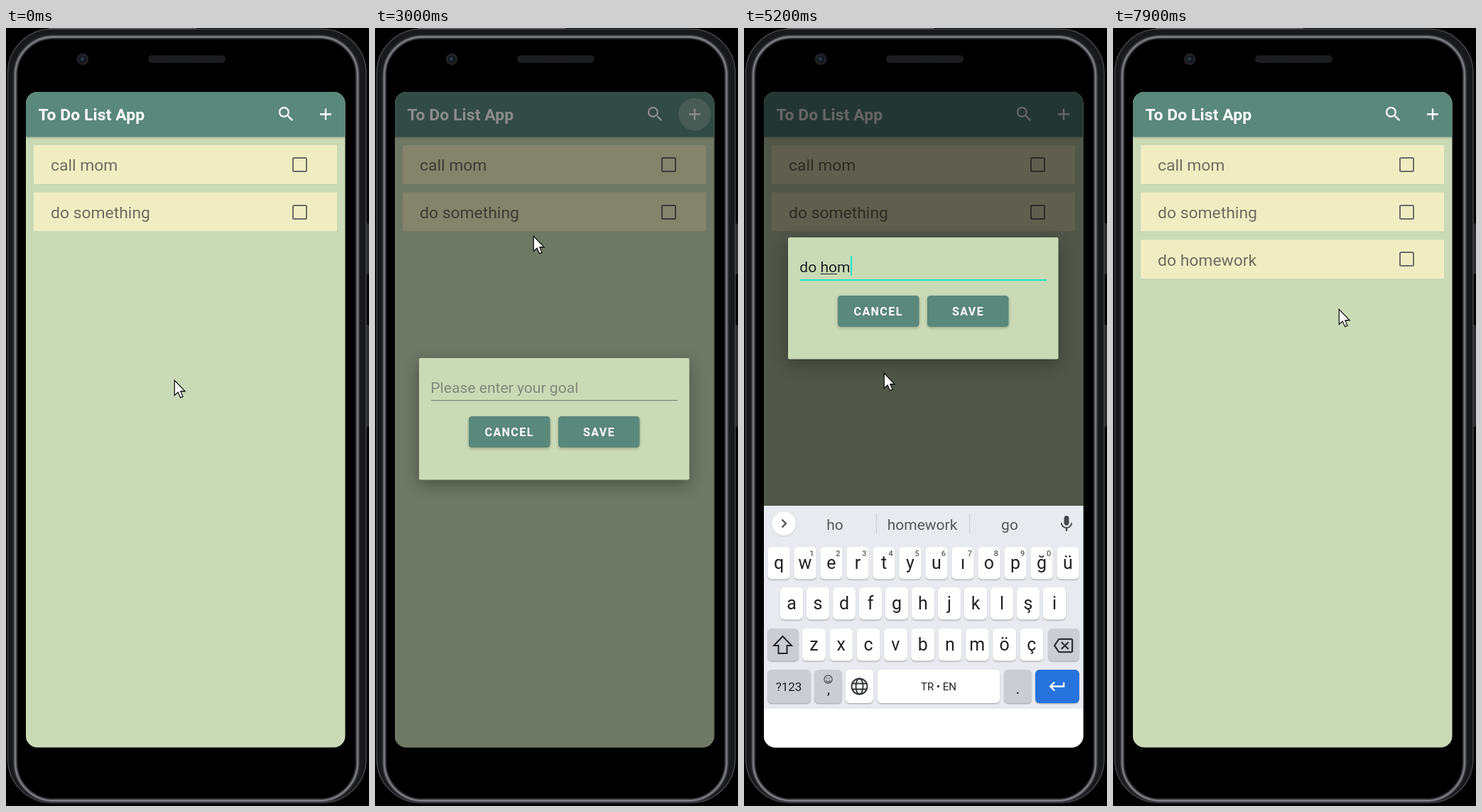
Recreate the animation shown at these times as an HTML page with a canvas. Size 511 by 1096 pixels, loop 8000 ms.

```html
<!DOCTYPE html>
<html lang="en">
<head>
<meta charset="utf-8">
<title>To Do List App</title>
<style>
html, body { margin: 0; width: 100%; height: 100%; overflow: hidden; background: #000; }
canvas { display: block; width: 511px; height: 1096px; }
</style>
</head>
<body>
<canvas id="stage"></canvas>
<script>
const W = 511, H = 1096, LOOP = 8000, STEP = 100;
const canvas = document.getElementById('stage');
const ctx = canvas.getContext('2d');
const dpr = window.devicePixelRatio || 1;
canvas.width = W * dpr;
canvas.height = H * dpr;

const TEAL = '#5a887b', GREEN = '#cadab7', ACCENT = '#1fe6c2', INK = '#202124';
const ICON = {
  search: 'M15.5 14h-.79l-.28-.27C15.41 12.59 16 11.11 16 9.5 16 5.91 13.09 3 9.5 3S3 5.91 3 9.5 5.91 16 9.5 16c1.61 0 3.09-.59 4.23-1.57l.27.28v.79l5 4.99L20.49 19l-4.99-5zm-6 0C7.01 14 5 11.99 5 9.5S7.01 5 9.5 5 14 7.01 14 9.5 11.99 14 9.5 14z',
  plus: 'M19 13h-6v6h-2v-6H5v-2h6V5h2v6h6v2z',
  mic: 'M12 14c1.66 0 3-1.34 3-3V5c0-1.66-1.34-3-3-3S9 3.34 9 5v6c0 1.66 1.34 3 3 3zm5.3-3c0 3-2.54 5.1-5.3 5.1S6.7 14 6.7 11H5c0 3.41 2.72 6.23 6 6.72V21h2v-3.28c3.28-.48 6-3.3 6-6.72h-1.7z',
  erase: 'M22 3H7c-.69 0-1.23.35-1.59.88L0 12l5.41 8.11c.36.53.9.89 1.59.89h15c1.1 0 2-.9 2-2V5c0-1.1-.9-2-2-2zm0 16H7.07L2.4 12l4.66-7H22v14zm-11.59-2L14 13.41 17.59 17 19 15.59 15.41 12 19 8.41 17.59 7 14 10.59 10.41 7 9 8.41 12.59 12 9 15.59z',
  enter: 'M19 7v4H5.83l3.58-3.59L8 6l-6 6 6 6 1.41-1.41L5.83 13H21V7z'
};
for (const name in ICON) ICON[name] = new Path2D(ICON[name]);

// Pointer way points: time, x, y
const PATH = [
  [0, 237, 496], [1000, 237, 496], [1300, 248, 463], [1800, 400, 235],
  [2200, 447, 117], [2700, 447, 117], [3000, 223, 293], [3400, 197, 486],
  [6100, 197, 486], [6600, 318, 396], [LOOP, 318, 396]
];
const GOAL = 'do homework';
const TYPED = [4600, 4700, 4800, 4900, 5000, 5200, 5400, 5500, 5600, 5700, 5900];

const clamp = v => Math.max(0, Math.min(1, v));
const ramp = (t, from, to) => clamp((t - from) / (to - from));
const ease = v => v * v * (3 - 2 * v);

function box(x, y, w, h, r) {
  ctx.beginPath();
  ctx.roundRect(x, y, w, h, r);
}

function fillBox(x, y, w, h, r, color) {
  box(x, y, w, h, r);
  ctx.fillStyle = color;
  ctx.fill();
}

function shadowBox(x, y, w, h, r, color, drop, blur, alpha) {
  ctx.save();
  ctx.shadowColor = `rgba(0,0,0,${alpha})`;
  ctx.shadowOffsetY = drop * dpr;
  ctx.shadowBlur = blur * dpr;
  fillBox(x, y, w, h, r, color);
  ctx.restore();
}

function disc(x, y, r, color) {
  ctx.beginPath();
  ctx.arc(x, y, r, 0, 7);
  ctx.fillStyle = color;
  ctx.fill();
}

function stroke(color, width) {
  ctx.strokeStyle = color;
  ctx.lineWidth = width;
  ctx.stroke();
}

function line(points, color, width, close) {
  ctx.beginPath();
  points.forEach(([x, y]) => ctx.lineTo(x, y));
  if (close) ctx.closePath();
  stroke(color, width);
}

function label(str, x, y, size, color, { weight = 400, align = 'left', gap = 0, max } = {}) {
  ctx.font = `${weight} ${size}px Roboto, sans-serif`;
  ctx.letterSpacing = gap + 'px';
  ctx.textAlign = align;
  ctx.fillStyle = color;
  if (max) ctx.fillText(str, x, y, max);
  else ctx.fillText(str, x, y);
  ctx.letterSpacing = '0px';
}

function icon(name, cx, cy, color) {
  ctx.save();
  ctx.translate(cx, cy);
  ctx.scale(1.145, 1.145);
  ctx.translate(-12, -12);
  ctx.fillStyle = color;
  ctx.fill(ICON[name]);
  ctx.restore();
}

function drawPhone() {
  ctx.fillStyle = '#000';
  ctx.fillRect(0, 0, W, H);
  ctx.fillStyle = '#666769';
  ctx.fillRect(60, 0, 208, 1);
  for (const [y, h] of [[275, 72], [418, 144]]) {
    fillBox(506, y, 5, h, 2, '#2a2b2d');
  }
  fillBox(2.5, 1.5, 504.5, 1090, 62, '#18191b');
  stroke('#454648', 1.5);

  box(13, 12.5, 482, 1076, 54);
  ctx.fillStyle = '#000';
  ctx.fill();
  stroke('#303134', 6.5);
  stroke('#77797c', 2.8);

  disc(108, 44, 8.2, '#222427');
  disc(108, 44, 5.6, '#14181e');
  disc(107.5, 43.5, 2.6, '#27384a');
  fillBox(200, 38.5, 109, 10.5, 5, '#1d1e20');
  ctx.fillStyle = '#121314';
  for (let x = 204; x < 306; x += 4) {
    ctx.fillRect(x, 41, 1.5, 1.5);
    ctx.fillRect(x + 2, 45, 1.5, 1.5);
  }
}

function drawItem(str, y) {
  shadowBox(39, y, 427, 55, 1, '#f0edc3', 0.5, 1.5, 0.08);
  label(str, 63, y + 36.3, 22.9, '#6e6d5d');
  box(404, Math.round(y) + 18, 19, 19, 1.5);
  stroke('#6d6c67', 2);
}

function drawApp(t) {
  ctx.fillStyle = GREEN;
  ctx.fillRect(28, 90, 450, 924);
  shadowBox(28, 90, 450, 63.5, 0, TEAL, 1, 3, 0.15);
  const press = ramp(t, 2500, 2700) * (1 - ramp(t, 3000, 3300));
  if (press > 0) disc(450, 121.5, 14 + 9 * ramp(t, 2500, 2800), `rgba(255,255,255,${0.24 * press})`);
  label('To Do List App', 45.5, 130.3, 22.9, '#fff', { weight: 600, gap: 0.1 });
  icon('search', 394.3, 121.3, '#fff');
  icon('plus', 450, 121.5, '#fff');
  drawItem('call mom', 165);
  drawItem('do something', 231.6);
  const added = ramp(t, 6950, 7200);
  if (added > 0) {
    ctx.globalAlpha = added;
    drawItem('do homework', 298.2);
    ctx.globalAlpha = 1;
  }
}

function drawButton(str, x, textX, y) {
  shadowBox(x, y, 114.5, 44, 4.5, TEAL, 1.5, 4, 0.25);
  label(str, textX, y + 28.4, 16, '#fff', { weight: 600, gap: 1.43 });
}

function drawField(t, y) {
  const focus = t >= 3700, x = 78.3, size = 21.1;
  const count = TYPED.filter(s => s <= t).length;
  const marked = TYPED.filter(s => s < t).length;
  const text = GOAL.slice(0, count);
  if (count) label(text, x, y + 48.5, size, INK);
  else label('Please enter your goal', x, y + 48.5, size, '#82897a');

  const wide = n => ctx.measureText(GOAL.slice(0, n)).width;
  if (marked > 3) {
    ctx.fillStyle = INK;
    ctx.fillRect(x + wide(3), y + 51, wide(marked) - wide(3), 1);
  }
  ctx.fillStyle = focus ? ACCENT : '#7b8373';
  ctx.fillRect(79, y + 59, 347, focus ? 2.2 : 1.2);

  const last = count ? TYPED[count - 1] : 3700;
  if (focus && (t - last) % 1000 < 500) {
    ctx.fillStyle = ACCENT;
    ctx.fillRect(x + 0.3 + wide(count), y + 26, 2.2, 28);
  }
}

function drawDialog(t) {
  const show = ramp(t, 2800, 2980) * (1 - ramp(t, 6900, 7080));
  if (show <= 0) return;
  const y = 465 - 170 * ease(ramp(t, 3715, 4015));
  const scale = t < 4000 ? 0.9 + 0.1 * show : 1;
  ctx.save();
  ctx.globalAlpha = show;
  ctx.translate(252, y + 86);
  ctx.scale(scale, scale);
  ctx.translate(-252, -y - 86);
  shadowBox(62, y, 380.5, 171.5, 2, '#cbdab6', 7, 22, 0.32);
  drawField(t, y);
  drawButton('CANCEL', 132, 154.5, y + 82);
  drawButton('SAVE', 258, 293, y + 82);
  if (t >= 6600) {
    box(258, y + 82, 114.5, 44, 4.5);
    ctx.clip();
    disc(317, y + 103, 10 + 30 * ramp(t, 6600, 6800), 'rgba(255,255,255,.2)');
  }
  ctx.restore();
}

function drawKey(cx, y, w, color = '#fff', h = 45.5) {
  shadowBox(cx - w / 2, y, w, h, 6, color, 1.2, 1.5, 0.28);
}

function drawLetters(str, x, pitch, y, w) {
  [...str].forEach((ch, i) => {
    const cx = x + i * pitch;
    drawKey(cx, y, w);
    label(ch, cx, y + 31, 25, INK, { align: 'center' });
  });
}

function drawTools() {
  const grey = '#55585d';
  icon('search', 116, 698, grey);
  box(171, 688, 18, 19, 3);
  stroke(grey, 2);
  disc(177, 694, 1.4, grey);
  disc(183, 694, 1.4, grey);
  ctx.beginPath();
  ctx.arc(180, 697, 5, 0.2, Math.PI - 0.2);
  stroke(grey, 1.8);
  line([[183, 707], [183, 701], [189, 701]], grey, 1.5);
  label('GIF', 244, 703, 16, grey, { weight: 900, align: 'center', gap: 0.5 });
  box(301, 689, 17, 19, 2);
  stroke(grey, 2);
  fillBox(305, 686, 9, 6, 2, grey);
  for (const y of [696, 700, 704]) line([[305, y], [314, y]], grey, 1.5);
  line([[348.5, 684], [348.5, 712]], '#cfd1d6', 1);
  for (const x of [382, 389.5, 397]) disc(x, 697.5, 2.5, grey);
}

function drawHints(t) {
  const words = t > 5500 ? ['homework', 'homeworks', 'homeworking'] : ['ho', 'homework', 'go'];
  words.forEach((word, i) => {
    label(word, 128 + 123 * i, 706.5, 21, '#55585d', { align: 'center', max: i === 1 ? 112 : 100 });
  });
  for (const x of [186.5, 317.5]) line([[x, 684], [x, 712]], '#c9cbd0', 1);
}

function drawKeyboard(t) {
  const up = ease(ramp(t, 3700, 3996)) * (1 - ease(ramp(t, 6950, 7200)));
  if (up <= 0) return;
  ctx.save();
  ctx.globalAlpha = 1 - ramp(t, 6950, 7200);
  ctx.translate(0, 341 * (1 - up));
  ctx.fillStyle = '#e8eaf0';
  ctx.fillRect(28, 673, 450, 286);
  ctx.fillStyle = '#fff';
  ctx.fillRect(28, 959, 450, 55);

  const hints = t > 4900, dir = hints ? 1 : -1;
  shadowBox(39, 681, 34, 34, 17, '#fff', 0.5, 2, 0.2);
  line([[56 - 2.5 * dir, 692.5], [56 + 3 * dir, 698], [56 - 2.5 * dir, 703.5]], '#45484d', 2.1);
  if (hints) drawHints(t);
  else drawTools();
  icon('mic', 454, 698.5, '#45484d');

  drawLetters('qwertyuıopğü', 49, 37, 731, 31.5);
  [...'1234567890'].forEach((d, i) => {
    label(d, 95.3 + 37.1 * i, 743.5, 11, '#5a5d62', { weight: 500, align: 'center' });
  });
  drawLetters('asdfghjklşi', 67, 37, 788, 32);
  drawLetters('zxcvbnmöç', 98.5, 38.3, 846, 33);

  const grey = '#cbcdd3';
  drawKey(55, 846, 44, grey);
  line([[54.5, 857], [67, 870], [60.5, 870], [60.5, 881], [48.5, 881], [48.5, 870], [42, 870]], INK, 2, true);
  drawKey(450, 846, 44, grey);
  icon('erase', 449.5, 870, '#303236');

  drawKey(63.5, 904, 61, grey, 47);
  label('?123', 63, 934, 17, INK, { align: 'center' });
  drawKey(118.5, 904, 39, grey, 47);
  ctx.beginPath();
  ctx.arc(118.5, 917.5, 5.6, 0, 7);
  stroke('#45484d', 1.2);
  ctx.beginPath();
  ctx.arc(118.5, 918, 3, 0.2, 2.94);
  stroke('#45484d', 1.2);
  disc(116.6, 915.8, 0.9, '#45484d');
  disc(120.4, 915.8, 0.9, '#45484d');
  label(',', 119, 938, 21, INK, { align: 'center' });

  drawKey(162.5, 904, 39, '#fff', 47);
  for (const rx of [11, 5]) {
    ctx.beginPath();
    ctx.ellipse(162.5, 927.5, rx, 11, 0, 0, 7);
    stroke('#303236', 1.9);
  }
  for (const dy of [-4, 4]) line([[152.5, 927.5 + dy], [172.5, 927.5 + dy]], '#303236', 1.9);

  drawKey(274, 904, 173, '#fff', 47);
  label('TR • EN', 274, 933, 15, INK, { align: 'center' });
  drawKey(385.5, 904, 39, grey, 47);
  label('.', 385.5, 938, 22, INK, { align: 'center' });
  drawKey(441, 904, 62, '#2673dd', 47);
  icon('enter', 441, 927.5, '#fff');

  // The keyboard starts under the dim layer and brightens as it rises
  ctx.fillStyle = `rgba(0,0,0,${0.6 * (1 - ramp(t, 3700, 3970))})`;
  ctx.fillRect(28, 673, 450, 341);
  ctx.restore();
}

function drawPointer(t) {
  const i = PATH.findIndex(p => p[0] > t);
  const [t0, x0, y0] = PATH[i - 1], [t1, x1, y1] = PATH[i];
  const k = (t - t0) / (t1 - t0);
  ctx.save();
  ctx.translate(x0 + (x1 - x0) * k, y0 + (y1 - y0) * k);
  ctx.scale(1.28, 1.28);
  ctx.beginPath();
  for (const [x, y] of [[0, 0], [0, 16.5], [3.8, 13], [6.5, 19], [9.2, 17.9], [6.7, 12], [11.6, 12]]) {
    ctx.lineTo(x + 0.2, y + 0.3);
  }
  ctx.closePath();
  ctx.fillStyle = '#fff';
  ctx.fill();
  stroke('#111', 1);
  ctx.restore();
}

function draw(t) {
  ctx.setTransform(dpr, 0, 0, dpr, 0, 0);
  drawPhone();
  ctx.save();
  box(28, 90, 449.5, 923.5, 16);
  ctx.clip();
  drawApp(t);
  if (t > 3700 && t < 7200) {
    ctx.fillStyle = '#fff';
    ctx.fillRect(28, 673, 450, 341);
  }
  const dim = 0.6 * ramp(t, 2800, 3067) * (1 - ramp(t, 6900, 7200));
  ctx.fillStyle = `rgba(0,0,0,${dim})`;
  ctx.fillRect(28, 90, 450, 924);
  drawDialog(t);
  drawKeyboard(t);
  ctx.restore();
  drawPointer(t);
}

function tick() {
  const t = performance.now() % LOOP;
  draw(Math.floor(t / STEP) * STEP);
  requestAnimationFrame(tick);
}
tick();
</script>
</body>
</html>
```
